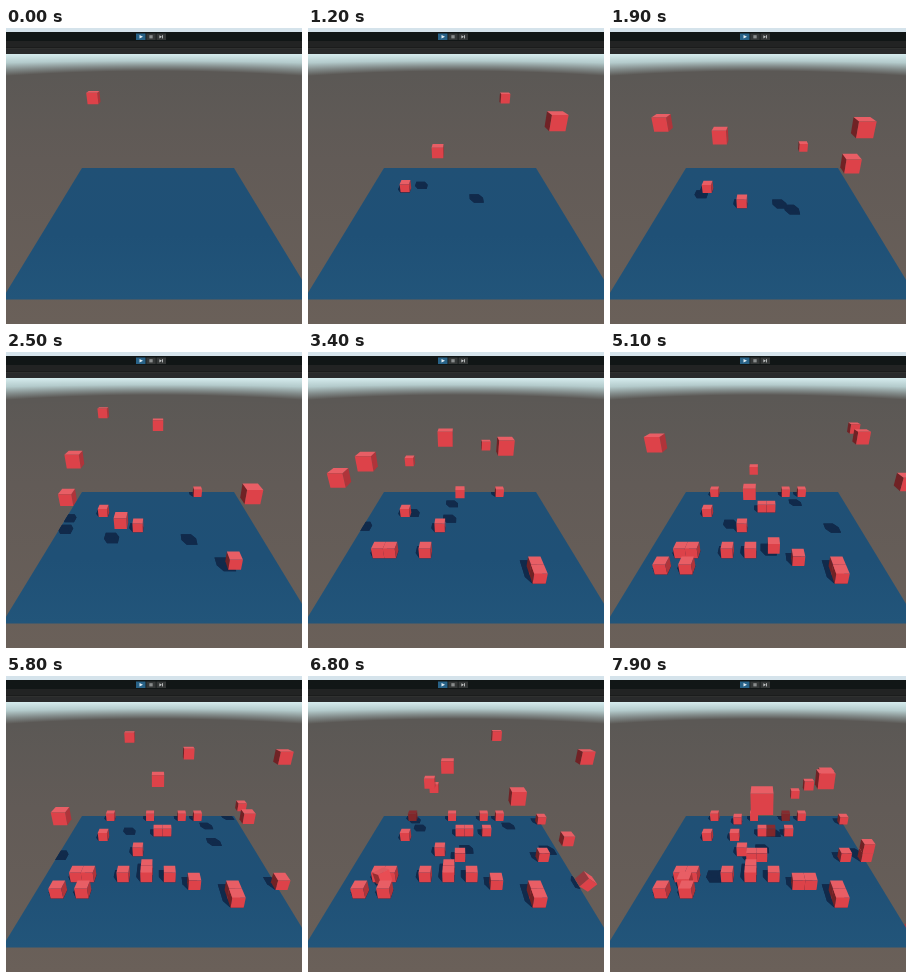
Animation, 296 px wide and 296 px high, one loop 8 s. Source, as an HTML page with a canvas:

```html
<!DOCTYPE html>
<html lang="en">
<head>
<meta charset="utf-8">
<title>Falling cubes</title>
<style>
html, body { margin: 0; width: 100%; height: 100%; overflow: hidden; background: #5f5955; }
canvas { display: block; width: 296px; height: 296px; }
</style>
</head>
<body>
<canvas id="stage"></canvas>
<script>
const SIZE = 296, LOOP = 8000, STEP = 100;
const canvas = document.getElementById('stage');
const ctx = canvas.getContext('2d');
const ratio = window.devicePixelRatio || 1;
canvas.width = canvas.height = SIZE * ratio;

// Camera pitched down, looking along +z; one unit is one cube
const SIN = 0.474, COS = 0.8805, FOCAL = 261, CX = 152, CY = 155.7, CAM = 14.46;
const DROP = 9.7, GRAVITY = 9.81, HALF = 0.5;
const WIDE = 10, NEAR = 11.2, FAR = 31.2;
const LIGHT = [0.321, 0.766, -0.557];

const clamp = (v) => Math.max(0, Math.min(1, v));
const ease = (v) => { v = clamp(v); return v * v * (3 - 2 * v); };
const dot = (a, b) => a[0] * b[0] + a[1] * b[1] + a[2] * b[2];

function project([x, y, z]) {
  const d = z * COS + (CAM - y) * SIN;
  return [CX + FOCAL * x / d, CY + FOCAL * ((CAM - y) * COS - z * SIN) / d];
}

// Floor cells in order of arrival: column from the middle, row from the back
const cells = [
  [-6, 5], [-2, 8], [5, 0], [6, 14], [-3, 12], [-7, 12], [6, 15], [-6, 12],
  [0, 4], [-6, 0], [3, 0], [-8, 14], [-6, 14], [3, 13], [-1, 12], [1, 4],
  [1, 12], [-1, 0], [-1, 11], [10.2, 13], [10, 1], [8, 9], [-7, 13], [0, 9],
  [3, 4], [10, 9], [-3, 1], [-3, 5], [4, 13], [-1, 9], [10, 9], [4, 0],
  [5, 3], [-10, 19], [5, 10], [4, 14], [0, 19]
];

// A slow start, then five cubes per second
const spawnTime = (i) => i < 3 ? 0.46 * i - 0.2 : 0.53 + 0.2 * i;

// Held up by a cube below, or wedged between neighbours on both sides
function isBlocked([x, row], i) {
  const taken = (dx, dr) => cells.slice(0, i).some(([a, b]) => a === x + dx && b === row + dr);
  const side = (dx) => taken(dx, 0) || taken(dx, 1);
  return taken(0, 0) || (side(-1) && side(1));
}

const cubes = cells.map((cell, i) => {
  const blocked = isBlocked(cell, i);
  const rest = blocked ? 1 : 0;
  return {
    x: cell[0], z: FAR - 1 - cell[1], start: spawnTime(i), rest, blocked,
    fall: Math.sqrt(2 * (DROP - rest) / GRAVITY)
  };
});

// u is the time since landing
function wedge(c, u) {
  const a = ease(u / 0.45), b = ease((u - 0.8) / 0.6);
  c.yaw = 0.75 * a * (1 - b);
  c.roll = 0.3 * a * (1 - b);
  c.y -= 0.5 * a + 0.4 * b;
  c.x += 0.6 * a;
}

function slip(c, u) {
  const a = ease(u / 1.1), v = Math.max(0, u - 1.05);
  c.roll = -0.6 * a - 1.5 * v;
  c.x += 0.25 * a + 3 * v;
  c.y -= GRAVITY / 2 * v * v;
}

function pose(cube, t) {
  const age = t - cube.start, u = age - cube.fall;
  const y = HALF + Math.max(cube.rest, DROP - GRAVITY / 2 * age * age);
  const c = { x: cube.x, y, z: cube.z, yaw: 0, roll: 0 };
  if (u > 0 && cube.blocked) wedge(c, u);
  if (u > 0 && cube.x > WIDE) slip(c, u);
  return c;
}

function turn([x, y, z], c) {
  const cr = Math.cos(c.roll), sr = Math.sin(c.roll);
  const cy = Math.cos(c.yaw), sy = Math.sin(c.yaw);
  const rx = x * cr - y * sr, ry = x * sr + y * cr;
  return [rx * cy + z * sy, ry, z * cy - rx * sy];
}

function faces(c) {
  const list = [];
  for (let axis = 0; axis < 3; axis++) {
    for (const side of [-1, 1]) {
      const at = (u, v) => {
        const p = [0, 0, 0];
        p[axis] = side * HALF;
        p[(axis + 1) % 3] = u * HALF;
        p[(axis + 2) % 3] = v * HALF;
        const [x, y, z] = turn(p, c);
        return [x + c.x, y + c.y, z + c.z];
      };
      const n = [0, 0, 0];
      n[axis] = side;
      list.push({ normal: turn(n, c), points: [at(-1, -1), at(1, -1), at(1, 1), at(-1, 1)] });
    }
  }
  return list;
}

function trace(points) {
  ctx.beginPath();
  points.forEach((p) => ctx.lineTo(...project(p)));
  ctx.closePath();
}

// Is another cube between this one and the light?
function shaded(c, all) {
  return all.some((o) => {
    const d = [o.x - c.x, o.y - c.y, o.z - c.z];
    const along = dot(d, LIGHT);
    return o !== c && along > 1.8 && dot(d, d) - along * along < 0.5;
  });
}

function drawCube(c, all) {
  const dim = shaded(c, all) ? 0.15 : 1;
  for (const { normal, points } of faces(c)) {
    const p = points[0];
    if (dot(normal, [-p[0], CAM - p[1], -p[2]]) <= 0) continue;
    const r = Math.min(232, 112 + 196 * dim * Math.max(0, dot(normal, LIGHT)));
    const pale = 24 * dim * Math.max(0, normal[1]);
    ctx.fillStyle = `rgb(${r}, ${r * 0.3 + pale}, ${r * 0.33 + pale})`;
    trace(points);
    ctx.fill();
  }
}

function drawShadow(c) {
  for (const { points } of faces(c)) {
    trace(points.map(([x, y, z]) => {
      const k = y / LIGHT[1];
      return [x - LIGHT[0] * k, 0, z - LIGHT[2] * k];
    }));
    ctx.fill();
  }
}

function gradient(y0, y1, ...stops) {
  const g = ctx.createLinearGradient(0, y0, 0, y1);
  stops.forEach(([at, color]) => g.addColorStop(at, color));
  return g;
}

function bar(x, y, w, h, color) {
  ctx.fillStyle = color;
  ctx.fillRect(x, y, w, h);
}

function drawBackdrop() {
  bar(0, 0, SIZE, SIZE, gradient(44, SIZE, [0, '#5b5855'], [0.35, '#625b57'], [1, '#6a6059']));
  // Haze bends down towards both sides
  for (let x = 0; x < SIZE; x += 2) {
    const sag = 5 * ((x - 148) / 148) ** 2;
    bar(x, 24, 2, 24 + sag, gradient(26, 43 + sag,
      [0, '#d6ecee'], [0.4, '#b4cbcc'], [0.72, '#828b8a'], [1, '#5b5855']));
  }
}

function triangle(x, y, w, h) {
  ctx.beginPath();
  ctx.moveTo(x, y);
  ctx.lineTo(x + w, y + h / 2);
  ctx.lineTo(x, y + h);
  ctx.fill();
}

function drawToolbar() {
  bar(0, 0, SIZE, 4, '#d5e3eb');
  bar(0, 4, SIZE, 9, '#111616');
  bar(0, 13, SIZE, 7, '#222323');
  bar(0, 19.5, SIZE, 1, '#151616');
  bar(0, 20.5, SIZE, 5.5, '#292a2b');
  bar(130, 5.5, 9.5, 6.5, '#286287');
  bar(140.3, 5.5, 9.4, 6.5, '#343737');
  bar(150.5, 5.5, 9.5, 6.5, '#343737');
  ctx.fillStyle = '#e4eef3';
  triangle(133.5, 7, 3.5, 3.6);
  bar(143.6, 7.2, 1, 3.2, '#c2c5c5');
  bar(145.4, 7.2, 1, 3.2, '#c2c5c5');
  triangle(153.4, 7.2, 2.5, 3.2);
  bar(156, 7.2, 0.9, 3.2, '#c2c5c5');
}

function draw(t) {
  ctx.setTransform(ratio, 0, 0, ratio, 0, 0);
  drawBackdrop();

  const all = cubes.filter((c) => t >= c.start).map((c) => pose(c, t));
  const distance = (c) => Math.hypot(c.x, CAM - c.y, c.z);
  all.sort((a, b) => distance(b) - distance(a));

  // Fallen cubes are hidden behind the floor
  all.filter((c) => c.y < -HALF).forEach((c) => drawCube(c, all));
  const above = all.filter((c) => c.y >= -HALF);

  ctx.save();
  trace([[-WIDE, 0, FAR], [WIDE, 0, FAR], [WIDE, 0, NEAR], [-WIDE, 0, NEAR]]);
  ctx.fillStyle = gradient(140, 272, [0, '#205075'], [0.5, '#1f5076'], [1, '#22557a']);
  ctx.fill();
  ctx.clip();
  ctx.fillStyle = '#112a4b';
  above.forEach(drawShadow);
  ctx.restore();

  above.forEach((c) => drawCube(c, all));
  drawToolbar();
}

const begin = performance.now();
function tick() {
  const ms = (performance.now() - begin) % LOOP;
  draw(Math.floor(ms / STEP) * STEP / 1000);
  requestAnimationFrame(tick);
}
tick();
</script>
</body>
</html>
```
